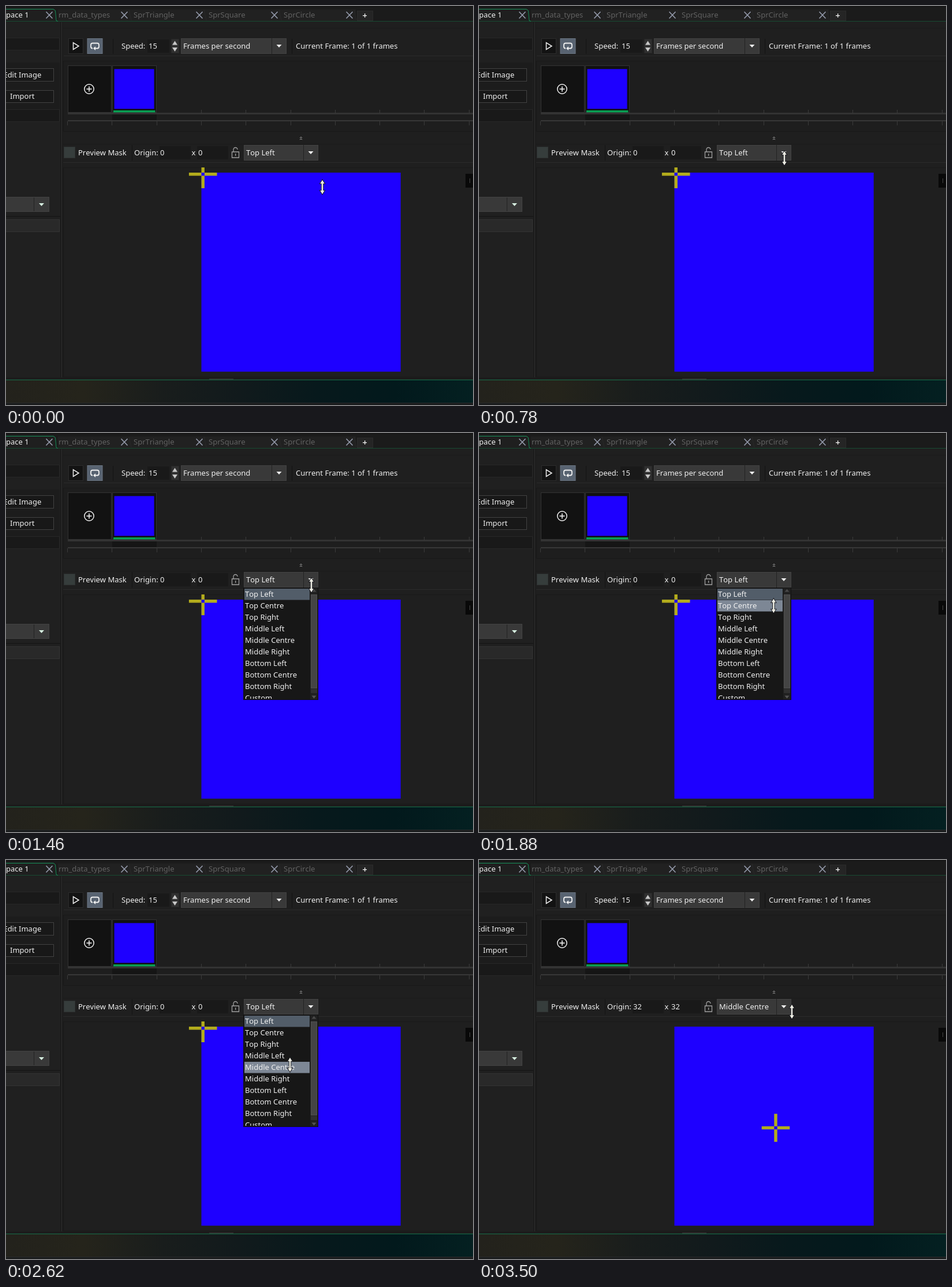
An HTML page with a canvas for the animation above (3.52 s loop, 809 px wide and 692 px high).

```html
<!DOCTYPE html>
<html lang="en">
<head>
<meta charset="utf-8">
<title>Sprite editor</title>
<style>
  html, body { margin: 0; width: 100%; height: 100%; overflow: hidden; background: #1f1f1f; }
  canvas { display: block; }
</style>
</head>
<body>
<canvas id="stage" width="809" height="692"></canvas>
<script>
const ctx = document.getElementById('stage').getContext('2d');
const LOOP = 3520, OPEN = 1140, PICK = 2780;
const BLUE = '#1e00ff', YELLOW = '#b3ac1c', TEXT = '#f0f0f0', DIM = '#626262', EDGE = '#343434';
const SPRITE = { x: 338.5, y: 289, size: 345.2 };
const PIXEL = 5.4;
const OPTIONS = ['Top Left', 'Top Centre', 'Top Right', 'Middle Left', 'Middle Centre',
  'Middle Right', 'Bottom Left', 'Bottom Centre', 'Bottom Right', 'Custom'];

// Pointer moves: start, end, destination x and y
const START = [548, 314];
const MOVES = [
  [280, 740, 529, 264],
  [1680, 2080, 492, 335],
  [2220, 2580, 492, 355],
  [2780, 2900, 493.5, 357],
  [3380, 3500, 542, 263]
];

function rect(x, y, w, h, color) {
  ctx.fillStyle = color;
  ctx.fillRect(x, y, w, h);
}

function box(x, y, w, h, fill, edge) {
  rect(x, y, w, h, edge);
  rect(x + 1, y + 1, w - 2, h - 2, fill);
}

function label(text, x, y, color = TEXT) {
  ctx.font = '13px "Noto Sans", "Open Sans", sans-serif';
  ctx.fontKerning = 'none';
  ctx.fillStyle = color;
  ctx.fillText(text, x, y);
}

function polygon(points, fill, stroke, width = 1) {
  ctx.beginPath();
  points.forEach(([x, y]) => ctx.lineTo(x, y));
  ctx.closePath();
  if (stroke) {
    ctx.strokeStyle = stroke;
    ctx.lineWidth = width;
    ctx.stroke();
  }
  if (fill) {
    ctx.fillStyle = fill;
    ctx.fill();
  }
}

function line(points, color, width = 1) {
  ctx.beginPath();
  points.forEach(([x, y]) => ctx.lineTo(x, y));
  ctx.strokeStyle = color;
  ctx.lineWidth = width;
  ctx.stroke();
}

// Triangle pointing down for positive h, up for negative h
function triangle(x, y, w, h, color) {
  polygon([[x - w / 2, y - h / 2], [x + w / 2, y - h / 2], [x, y + h / 2]], color);
}

function dropdown(x, y, w, h, split, text) {
  box(x, y, w, h, '#393939', '#434343');
  rect(split, y, 1, h, '#222');
  triangle((split + x + w) / 2, y + h / 2, 9, 5, TEXT);
  label(text, x + 4, y + 18);
}

function drawTabs() {
  rect(0, 0, 809, 27, '#1b1b1b');
  rect(0, 0, 809, 2, '#151515');
  rect(90, 6, 516, 20, '#212121');
  rect(0, 26, 809, 1, '#174a32');
  rect(0, 5, 85, 21, '#1f1f1f');
  line([[0, 5.5], [82, 5.5], [85.5, 8], [87, 25.5], [90, 26.5]], '#17915a');
  ['pace 1', 'rm_data_types', 'SprTriangle', 'SprSquare', 'SprCircle'].forEach((name, i) => {
    const x = 75 + 130 * i;
    label(name, i ? x - 114 : 0, 20, i ? DIM : TEXT);
    for (const side of [-1, 1]) {
      line([[x - 5.5 * side, 10], [x + 5.5 * side, 21.5]], '#949aab', 1.7);
    }
    if (i) line([[x + 8, 6.5], [x + 12, 25]], '#292929');
  });
  box(608, 8, 28, 18, '#252525', '#2b2b2b');
  rect(618, 16, 7, 1.3, TEXT);
  rect(621, 13, 1.3, 7, TEXT);
}

function drawSidebar() {
  rect(0, 28, 94, 616, '#202020');
  box(-1, 55, 94, 22, '#191919', '#272727');
  rect(0, 98, 93, 81, '#1c1c1c');
  box(-1, 108, 84, 23, '#181818', '#424242');
  box(-1, 146, 84, 22, '#181818', '#424242');
  label('Edit Image', -4.6, 124);
  label('Import', 7, 161);
  box(-1, 179, 94, 22, '#191919', '#272727');
  box(-1, 331, 76, 26, '#393939', '#434343');
  rect(48, 332, 1, 24, '#222');
  triangle(61.5, 344.5, 9, 5, '#d8f2e2');
  rect(0, 364, 94, 2, '#191919');
  box(-1, 370, 94, 22, '#292929', '#343434');
  rect(94, 28, 5, 616, '#1b1b1b');
  rect(96, 28, 1, 616, '#303030');
}

function drawPlayback() {
  rect(99, 38, 710, 1, '#1a1a1a');
  rect(100, 86, 709, 1, '#2b2b2b');
  box(108, 56, 26, 27, '#131313', '#2c2c2c');
  polygon([[116.5, 63.5], [116.5, 75.5], [126, 69.5]], null, TEXT, 1.5);
  box(140.5, 56, 27, 27, '#586371', '#6b7683');
  ctx.beginPath();
  ctx.roundRect(147, 64.5, 14, 9, 3);
  ctx.strokeStyle = TEXT;
  ctx.lineWidth = 1.8;
  ctx.stroke();
  rect(150, 72, 3, 3, '#586371');
  polygon([[151, 73.5], [155, 70], [155, 77]], TEXT);
  for (const x of [185, 495]) rect(x, 57, 1, 26, '#131313');
  label('Speed:', 200, 74);
  rect(245, 58, 38, 23, '#191919');
  label('15', 247, 74);
  box(286, 57, 14, 25, '#303030', '#282828');
  triangle(292.5, 64, 9, -7, '#c7c7c7');
  triangle(292.5, 75.5, 9, 7, '#c7c7c7');
  dropdown(303, 56, 183, 27, 460, 'Frames per second');
  label('Current Frame: 1 of 1 frames', 502, 74);
}

function drawTimeline() {
  box(99, 95, 712, 123, '#1e1e1e', '#191919');
  box(107, 103, 76, 82, '#121212', '#333');
  ctx.beginPath();
  ctx.arc(144, 144, 8.2, 0, 7);
  ctx.strokeStyle = TEXT;
  ctx.lineWidth = 1.5;
  ctx.stroke();
  rect(139.5, 143.2, 9, 1.6, TEXT);
  rect(143.2, 139.5, 1.6, 9, TEXT);
  box(184, 103, 77, 82, '#111', '#333');
  rect(187.6, 109.4, 69, 69, BLUE);
  rect(186, 181, 72.5, 3.5, '#08a052');
  rect(107, 185, 702, 3, '#333');
  rect(184, 188, 77, 10, '#151515');
  rect(107, 198, 702, 2, '#373737');
  for (let i = 0; i < 10; i++) {
    const x = Math.round(106 + 77.3 * i);
    if (i > 2) rect(x, 180, 1, 6, '#3b3b3b');
    rect(x, 200, 1, 7, '#3b3b3b');
  }
  for (const y of [228, 231]) line([[509, y + 1], [511, y - 1], [513, y + 1]], '#aaa');
}

function drawOriginBar(centred) {
  const origin = centred ? '32' : '0';
  rect(99, 239, 710, 1, '#1a1a1a');
  rect(99, 271, 710, 1, '#2b2b2b');
  box(100, 244, 20, 20, '#363d3c', '#2e3232');
  label('Preview Mask', 125, 259);
  rect(218, 241, 1, 27, '#131313');
  label('Origin:', 222, 259);
  rect(266, 243, 54, 23, '#191919');
  label(origin, 267, 259);
  label('x', 321.5, 259);
  rect(331, 243, 54, 23, '#191919');
  label(origin, 333, 259);
  ctx.beginPath();
  ctx.rect(391.5, 253, 12, 10);
  ctx.moveTo(394, 253);
  ctx.lineTo(394, 249);
  ctx.arc(397.5, 249, 3.5, Math.PI, 0);
  ctx.strokeStyle = '#a0a0a0';
  ctx.lineWidth = 1.3;
  ctx.stroke();
  rect(397, 256, 1.3, 4, '#a0a0a0');
  dropdown(412, 241, 129, 27, 515, OPTIONS[centred ? 4 : 0]);
}

function drawSprite(centred) {
  box(99, 280, 712, 364, '#1f1f1f', '#191919');
  rect(SPRITE.x, SPRITE.y, SPRITE.size, SPRITE.size, BLUE);
  const offset = centred ? 32 * PIXEL : 0;
  const x = SPRITE.x + offset, y = SPRITE.y + offset;
  ctx.save();
  ctx.beginPath();
  ctx.rect(99, 280, 710, 363);
  ctx.clip();
  rect(x - 4 * PIXEL, y, 9 * PIXEL, PIXEL, YELLOW);
  rect(x, y - 4 * PIXEL, PIXEL, 9 * PIXEL, YELLOW);
  rect(x, y, PIXEL, PIXEL, BLUE);
  ctx.restore();
  rect(796, 291, 13, 24, '#090909');
  rect(803, 299, 1, 8, '#444');
}

function drawFooter() {
  rect(0, 644, 809, 4, '#1c1c1c');
  rect(352, 646, 42, 2, '#303030');
  const shade = ctx.createLinearGradient(0, 0, 809, 0);
  ['#23221c', '#25241b', '#191d1c', '#111a1c', '#07191c', '#02191c', '#042021']
    .forEach((color, i) => shade.addColorStop(i / 6, color));
  rect(0, 649, 809, 43, shade);
  rect(0, 648, 809, 1, '#17704a');
  rect(0, 688, 809, 1, '#292b2c');
  rect(0, 689, 809, 3, '#191b1c');
}

function drawList(hovered) {
  box(411, 268, 130, 195, '#171717', '#111');
  rect(413, 270, 113, 19.5, '#525d69');
  if (hovered >= 0) rect(413, 270 + 20 * hovered, 113, 19.5, '#7d8795');
  ctx.save();
  ctx.beginPath();
  ctx.rect(412, 269, 115, 192);
  ctx.clip();
  OPTIONS.forEach((name, i) => label(name, 414, 284 + 20 * i));
  ctx.restore();
  rect(527, 269, 13, 193, '#202020');
  triangle(533.5, 273, 8, -5, '#484848');
  box(528, 280, 11, 163, '#444', '#505050');
  rect(528, 444, 11, 7, '#303030');
  triangle(533.5, 458, 8, 5, '#555');
}

function drawPointer(x, y) {
  const half = [[0, -12.3], [3.8, -6], [1.3, -6.3], [1.3, 6.3], [3.8, 6], [0, 12.3]];
  const mirrored = half.slice(1, -1).reverse().map(([px, py]) => [-px, py]);
  polygon([...half, ...mirrored].map(([px, py]) => [x + px, y + py]), '#eeeee4', '#15151c', 1.8);
}

function pointerAt(time) {
  let [x, y] = START;
  for (const [from, to, endX, endY] of MOVES) {
    const p = Math.min(1, Math.max(0, (time - from) / (to - from)));
    const eased = p * p * (3 - 2 * p);
    x += (endX - x) * eased;
    y += (endY - y) * eased;
  }
  return [x, y];
}

function draw(time) {
  const centred = time >= PICK;
  const [x, y] = pointerAt(time);
  rect(0, 0, 809, 692, '#1f1f1f');
  drawTabs();
  drawSidebar();
  drawPlayback();
  drawTimeline();
  drawOriginBar(centred);
  drawSprite(centred);
  drawFooter();
  if (time >= OPEN && !centred) {
    drawList(x < 526 ? Math.floor((y - 270) / 20) : -1);
  }
  drawPointer(x, y);
}

function tick() {
  draw(performance.now() % LOOP);
  requestAnimationFrame(tick);
}
tick();
</script>
</body>
</html>
```
